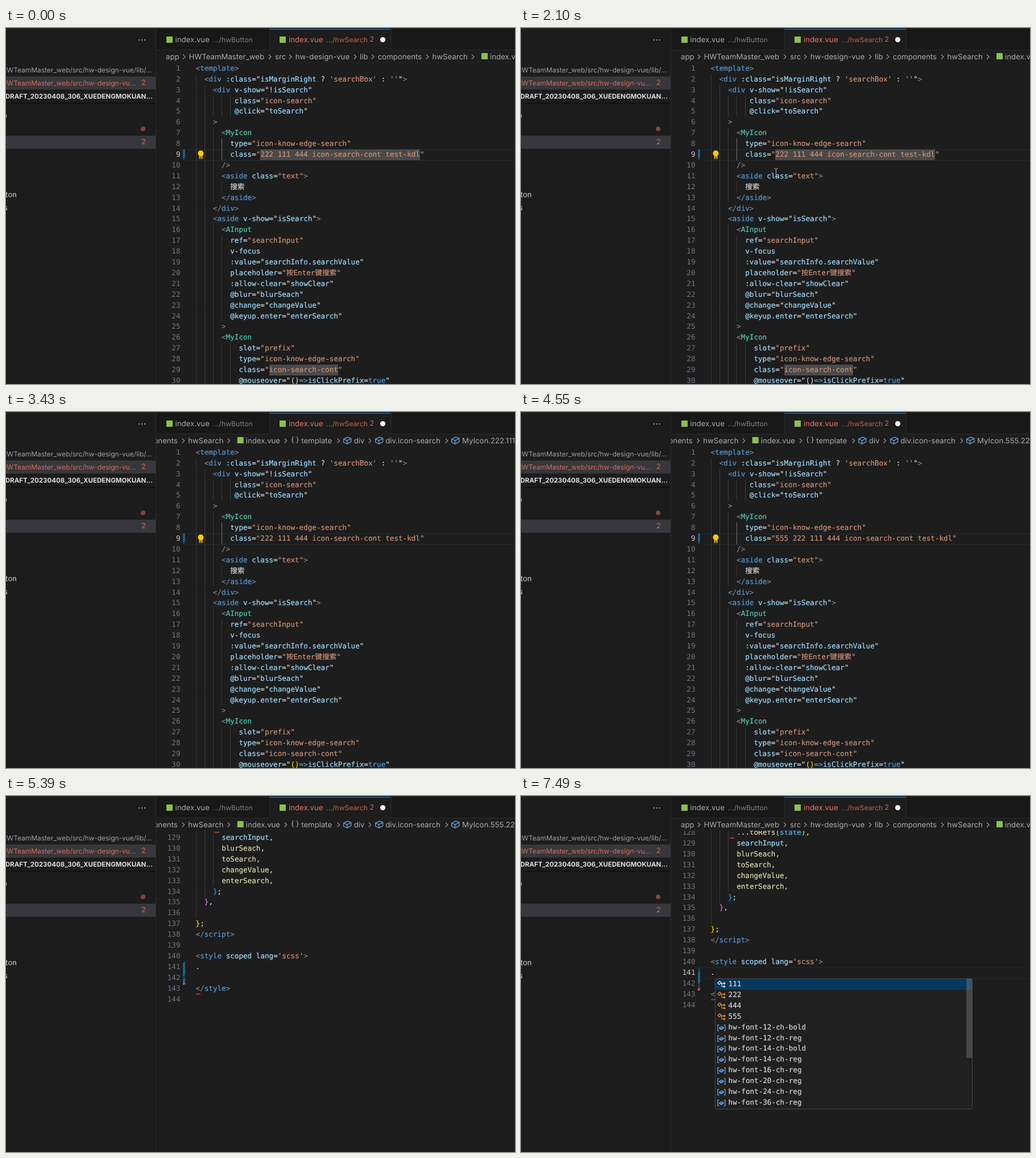
These frames come from a looping animation (895 px wide and 625 px high, 8 s). An HTML page:

```html
<!DOCTYPE html>
<html lang="en">
<head>
<meta charset="utf-8">
<title>Editor</title>
<style>
html, body { margin: 0; width: 100%; height: 100%; overflow: hidden; background: #1d1d1d; }
body { position: relative; text-rendering: geometricPrecision; -webkit-font-smoothing: antialiased; }
div, svg { position: absolute; }
.ui { font: 13.2px/20px Inter, "Noto Sans", sans-serif; white-space: pre; color: #ababab; }
.code { font: 12.6px/18.9px "DejaVu Sans Mono", "Noto Sans CJK SC", "Noto Sans CJK", monospace; white-space: pre; color: #d4d4d4; -webkit-text-stroke: .2px; }
#crumbs, #editor { inset: 0; overflow: hidden; }
#crumbs { clip-path: inset(40px 0 0 264px); }
#editor { clip-path: inset(61px 0 0 264px); --paren: #d4d4d4; }
.num { left: 256px; width: 50.5px; text-align: right; color: #6e7681; -webkit-text-stroke: 0; }
.hatch { left: 311px; width: 4px; background: repeating-linear-gradient(-45deg, #1f80bb 0 1.3px, #1d1d1d 1.3px 2.2px); }
.panel { box-sizing: border-box; background: #202020; border: 1px solid #454545; border-radius: 3px; overflow: hidden; }
</style>
</head>
<body>
<script>
const LOOP = 8000, STEP = 70;
const X0 = 333.6, CW = 7.586, TOP = 61.8, LH = 18.9;
const C = { grey: '#808080', tag: '#569cd6', comp: '#4ec9b0', attr: '#9cdcfe', str: '#ce9178',
  text: '#d4d4d4', fn: '#dcdcaa', red: '#ee7562', dim: '#d36c58', link: '#4daafc' };
const BRACKETS = ['#ffd700', '#da70d6', '#179fff'];

function add(parent, css, html = '', cls = '') {
  const d = document.createElement('div');
  d.style.cssText = css;
  d.className = cls;
  d.innerHTML = html;
  parent.append(d);
  return d;
}
const box = (p, x, y, w, h, bg, extra = '') =>
  add(p, `left:${x}px;top:${y}px;width:${w}px;height:${h}px;background:${bg};${extra}`);
const label = (p, x, mid, text, color = '', extra = '') =>
  add(p, `left:${x}px;top:${mid - 10}px;${color && `color:${color};`}${extra}`, text, 'ui');
const mono = (p, x, mid, html) => add(p, `left:${x}px;top:${mid - LH / 2}px`, html, 'code');
const icon = (p, x, y, w, h, shape) => add(p, `left:${x}px;top:${y}px;width:${w}px;height:${h}px`,
  `<svg width="${w}" height="${h}" viewBox="0 0 ${w} ${h}" style="left:0;top:0;overflow:visible">${shape}</svg>`);
const show = (e, on) => { e.style.display = on ? '' : 'none'; };
const esc = s => s.replace(/&/g, '&amp;').replace(/</g, '&lt;').replace(/>/g, '&gt;');
const ink = (color, s) => `<span style="color:${color}">${esc(s)}</span>`;
const lineTop = n => TOP + (n - 1) * LH;
const colX = c => X0 + c * CW;

// Code text
const head = `<template>
  <div :class="isMarginRight ? 'searchBox' : ''">
    <div v-show="!isSearch"
         class="icon-search"
         @click="toSearch"
    >
      <MyIcon
        type="icon-know-edge-search"
        class="222 111 444 icon-search-cont test-kdl"
      />
      <aside class="text">
        搜索
      </aside>
    </div>
    <aside v-show="isSearch">
      <AInput
        ref="searchInput"
        v-focus
        :value="searchInfo.searchValue"
        placeholder="按Enter键搜索"
        :allow-clear="showClear"
        @blur="blurSeach"
        @change="changeValue"
        @keyup.enter="enterSearch"
      >
      <MyIcon
          slot="prefix"
          type="icon-know-edge-search"
          class="icon-search-cont"
          @mouseover="()=>isClickPrefix=true"`.split('\n');
const middle = ['    const changeValue = () => {', '      state.showClear = true;', '      toSearch(state);',
  '    };', '', '    const blurSeach = () => {', '      state.isSearch = false;', '    };', ''];
const tail = `      ...toRefs(state),
      searchInput,
      blurSeach,
      toSearch,
      changeValue,
      enterSearch,
    };
  },
  
};
<\/script>

<style scoped lang='scss'>
.

</style>
`.split('\n');
const lines = [...head];
while (lines.length < 127) lines.push(middle[lines.length % middle.length]);
lines.push(...tail);

function paintExpr(s) {
  return s.replace(/('[^']*')|(=>|\btrue\b)|([\w$]+)|([()])|([^\w'])/g, (m, str, key, id, par) =>
    ink(str ? C.str : key ? C.tag : id ? C.attr : par ? 'var(--paren)' : C.text, m));
}
function paintMarkup(s) {
  return s.replace(/(<\/?)(\w+)|([:@]?[\w.-]+)(?:(=)("[^"]*"|'[^']*'))?|(\/?>)|([\s\S])/g,
    (m, open, tag, name, eq, val, close) => {
      if (open) return ink(C.grey, open) + ink(/[A-Z]/.test(tag) ? C.comp : C.tag, tag);
      if (close) return ink(C.grey, close);
      if (!name) return m;
      const left = ink(C.attr, name) + (eq || '');
      if (!val) return left;
      return left + (/^([:@]|v-)/.test(name) ? `"${paintExpr(val.slice(1, -1))}"` : ink(C.str, val));
    });
}
function paintScript(s) {
  const color = BRACKETS[s.search(/\S|$/) / 2 % 3];
  return s.replace(/\b(const|true|false)\b|\b(blurSeach|toSearch|changeValue|enterSearch|toRefs)\b|\b(state)\b|(\w+)|([{}()])|(.)/g,
    (m, key, fn, state, id, br) =>
      ink(key ? C.tag : fn ? C.fn : state ? '#4fc1ff' : id ? C.attr : br ? color : C.text, m));
}
const paint = (s, n) => n <= 30 || (n >= 138 && n !== 141) ? paintMarkup(s) : paintScript(s);

// Side bar
const side = box(document.body, 0, 0, 263, 625, '#1c1c1c', 'overflow:hidden;border-right:1px solid #2b2b2b');
const small = 'font-size:11.95px';
box(side, 0, 85, 263, 23, '#37373d');
box(side, 0, 189, 263, 23, '#37373d');
box(side, 0, 131, 263, 3, 'linear-gradient(#0e0e0e, #1c1c1c)');
label(side, -7.5, 73.5, 'HWTeamMaster_web/src/hw-design-vue/lib/...', '#a0a0a0', small);
label(side, -7.5, 97, 'HWTeamMaster_web/src/hw-design-vu...', C.dim, small);
label(side, 238, 97, '2', C.dim, 'font-size:12.6px');
add(side, 'right:5px;top:109.5px;color:#dedede;font-size:11.55px;font-weight:700', 'DRAFT_20230408_306_XUEDENGMOKUAN...', 'ui');
label(side, -6, 154, 'o', '#cccccc');
box(side, 237, 173, 8, 8, '#84493e', 'border-radius:50%');
label(side, 238, 200.5, '2', C.dim, 'font-size:12.6px');
label(side, -1, 293, 'ton', '#cccccc');
label(side, -4, 315.5, 's', '#cccccc');
for (const x of [232.5, 237.7, 242.9]) box(side, x, 19.5, 2, 2, '#c8c8c8', 'border-radius:50%');

// Tabs
box(document.body, 264, 0, 631, 38, '#181818', 'border-bottom:1px solid #2b2b2b');
box(document.body, 463, 1, 213, 38, '#1d1d1d', 'border:solid #2b2b2b;border-width:0 1px');
box(document.body, 0, 1, 895, 1, '#2b2b2b');
box(document.body, 463, 1, 214, 2, '#105a90');
const GREEN = '#8dc149';
const tabPath = 'font-size:12.2px';
box(document.body, 281.5, 14.5, 11, 11, GREEN);
label(document.body, 297.5, 20.5, 'index.vue', '#a9a9a9');
label(document.body, 364, 20.5, '.../hwButton', '#808080', tabPath);
box(document.body, 480.5, 14.5, 11, 11, GREEN);
label(document.body, 497, 20.5, 'index.vue', C.red);
label(document.body, 563.5, 20.5, '.../hwSearch', '#c2624f', tabPath);
label(document.body, 639.5, 20.5, '2', C.dim, 'font-size:12.6px');
box(document.body, 657.5, 15.5, 9, 9, '#fff', 'border-radius:50%');

// Breadcrumbs
const crumbs = add(document.body, '');
crumbs.id = 'crumbs';
const trail = add(crumbs, 'left:0;top:0');
const crumbNames = [[281, 'app'], [321.5, 'HWTeamMaster_web'], [473, 'src'], [508.7, 'hw-design-vue'], [622, 'lib'],
  [653.7, 'components'], [749.5, 'hwSearch'], [851, 'index.vue'], [948.5, 'template'], [1041, 'div'], [1096.5, 'div.icon-search']];
crumbNames.forEach(([x, s]) => label(trail, x, 50.5, s));
const lastCrumb = label(trail, 1231.3, 50.5, '');
for (const x of [313, 464, 500, 614, 645, 741, 821, 921, 1013.5, 1068.5, 1203.5])
  icon(trail, x - 3, 45.5, 6, 9, '<path d="M1 .5 5 4.5 1 8.5" fill="none" stroke="#9a9a9a" stroke-width="1.1"/>');
box(trail, 835.5, 44, 11, 11, GREEN);
label(trail, 930.5, 50, '{ }', '#b8b8b8', 'font-size:12.5px');
for (const x of [1029.5, 1085, 1219.5])
  icon(trail, x - 7.5, 43, 15, 14, '<path d="M1 4.5 8 1 14 3.6V9.5L7 13 1 10.2ZM1 4.5 7 7.2 14 3.6M7 7.2V13" fill="none" stroke="#75beff" stroke-width="1.1" stroke-linejoin="round"/>');

// Editor
const editor = add(document.body, '');
editor.id = 'editor';
const page = add(editor, 'left:0;top:0');
const current = box(page, 320, 0, 575, LH - 1, 'none', 'border:solid #2a2a2a;border-width:1px 0');
const mark = (n, c, len, bg) => box(page, colX(c), lineTop(n), len * CW, LH, bg);
const words = [mark(9, 15, 37, '#4a4a4a'), mark(29, 17, 16, '#4a4a4a')];
const hovered = mark(11, 13, 5, '#222d37');
const dotMark = mark(141, 0, 1, '#25506f');
const nums = [], rows = [];
lines.forEach((s, i) => {
  const n = i + 1, y = lineTop(n), indent = s.search(/\S|$/);
  for (let g = 0; g < indent; g += 2)
    box(page, Math.round(colX(g)), y, 1, LH, g === 6 && (n === 8 || n === 9) ? '#707070' : '#3b3b3b');
  nums[n] = add(page, `top:${y}px`, n, 'code num');
  rows[n] = add(page, `left:${X0}px;top:${y}px`, paint(s, n), 'code');
});
add(page, `top:${lineTop(9)}px;height:${LH}px`, '', 'hatch');
add(page, `top:${lineTop(141)}px;height:${2 * LH}px`, '', 'hatch');
icon(page, 311, lineTop(143) - 2, 5, 5, '<path d="M0 0 5 2.5 0 5Z" fill="#f14c4c"/>');
const wave = (x, y) => icon(page, x, y, 8, 3, '<path d="M0 2.5 2 .7 4 2.3 6 .7 8 2.3" fill="none" stroke="#e0483e" stroke-width="1.1"/>');
wave(367, lineTop(128) + 16.5);
wave(X0, lineTop(143) + 17);
icon(page, 337, lineTop(9) + 1.5, 11, 15,
  '<path d="M5.5 0a5 5 0 0 1 3 9V10.5h-6V9a5 5 0 0 1 3-9Z" fill="#ffcc00"/><path d="M3 11.5h5V14H3Z" fill="none" stroke="#ffcc00" stroke-width="1.2"/>');
const caret = box(page, 0, 0, 2, LH, '#c8c8c8');

// Hover card
const card = add(document.body, 'left:432px;top:128px;width:480px;height:123px', '', 'panel');
const hoverY = y => y - 129;
mono(card, 9, hoverY(142.5), '(' + ink(C.attr, 'property') + ') class: ' + ink(C.attr, 'string'));
box(card, 0, hoverY(156), 480, 1, '#3a3a3a');
const cardText = (x, y, s, c = '#d0d0d0') => label(card, x - 433, hoverY(y), s, c, 'font-size:12.55px');
cardText(442, 171, 'A space-separated list of the classes of the element. Classes allows CSS and');
cardText(442, 190.5, 'select and access specific elements via the');
cardText(702.5, 190.5, 'class selectors', C.link);
cardText(794.5, 190.5, 'or functions like the');
box(card, 10, hoverY(200.5), 257, 17, '#2b2b2b', 'border-radius:3px');
mono(card, 13.6, hoverY(209.5), ink(C.link, 'Document.getElementsByClassName()'));
cardText(701.5, 209.5, '.');
cardText(442, 236.5, 'MDN Reference', C.link);

// Completion list
const list = add(document.body, 'left:341px;top:320px;width:453px;height:230px', '', 'panel');
box(list, 0, 0, 451, LH, '#04395e');
const fonts = ['12-ch-bold', '12-ch-reg', '14-ch-bold', '14-ch-reg', '16-ch-reg', '20-ch-reg', '24-ch-reg', '36-ch-reg'];
['111', '222', '444', '555', ...fonts.map(f => 'hw-font-' + f)].forEach((s, i) => {
  const y = i * LH, tint = i ? '#ee9d28' : '#ffffff';
  mono(list, 22.6, y + LH / 2, s);
  icon(list, 2.5, y + 3, 15, 14, i < 4
    ? `<path d="M1 4.5 4.5 1 7 3.5 3.5 7ZM6 5h5M8 5V10.5H11M11 5 12.5 3.5 14 5 12.5 6.5ZM11 10.5 12.5 9 14 10.5 12.5 12Z" fill="none" stroke="${tint}" stroke-width="1.1"/>`
    : '<path d="M3.5 2H1V12H3.5M11.5 2H14V12H11.5M4 6.5 8 4.5 11 6V8L7 10 4 8.5ZM4 6.5 7 8 11 6M7 8V10" fill="none" stroke="#75beff" stroke-width="1.1"/>');
});
box(list, 441, 0, 10, 139, 'rgba(121,121,121,.45)');

// Pointers
const arrow = icon(document.body, 0, 0, 11, 17,
  '<path d="M.7 .8V13.2L3.6 10.5 5.6 15.2 8 14.2 6 9.6H10Z" fill="#000" stroke="#fff" stroke-width="1.1"/>');
const beam = icon(document.body, 0, 0, 7, 16,
  '<path d="M.5 .5Q3.5 .5 3.5 3V13Q3.5 15.5 .5 15.5M6.5 .5Q3.5 .5 3.5 3V13Q3.5 15.5 6.5 15.5" fill="none" stroke="#bbb"/>');

const clamp = v => Math.min(1, Math.max(0, v));
const span = (t, a, b) => clamp((t - a) / (b - a));
const smooth = p => p * p * (3 - 2 * p);
const mix = (a, b, p) => a + (b - a) * p;
const within = (t, a, b) => t >= a && t < b;
const moveTo = (e, x, y) => { e.style.transform = `translate(${x}px,${y}px)`; };

const END = 2702.7, REST = 2406.8;
function scrollAt(t) {
  if (t < 5040) return END * smooth(span(t, 4620, 4830));
  return REST + (END - REST) * Math.pow(1 - span(t, 5040, 5460), 1.9);
}
// [time, text put before the class names, caret column]
const typing = [[0, '', 15], [3780, ' ', 15], [3850, '5 ', 16], [3920, '55 ', 17], [4060, '555 ', 18]];
let typed = '';

function render(t) {
  const low = t >= 6440, active = low ? 141 : 9;
  moveTo(page, 0, -scrollAt(t));

  const [, prefix, col] = typing.filter(k => t >= k[0]).pop();
  if (prefix !== typed) {
    typed = prefix;
    rows[9].innerHTML = paint(lines[8].replace('"', '"' + prefix), 9);
  }
  const erased = within(t, 6720, 6930);
  show(rows[141], !erased);
  show(dotMark, within(t, 6650, 6720));
  words.forEach(w => show(w, t < 2870));
  editor.style.setProperty('--paren', t < 2520 ? C.text : BRACKETS[0]);

  current.style.top = lineTop(active) + 'px';
  nums[9].style.color = low ? '' : '#cccccc';
  nums[141].style.color = low ? '#cccccc' : '';
  show(caret, within(t, 2870, 3430) || within(t, 3780, 4550) || within(t, 6440, 7490));
  caret.style.left = (low ? colX(erased ? 0 : 1) : colX(col)) + 'px';
  caret.style.top = lineTop(active) + 'px';

  moveTo(trail, within(t, 3080, 6510) ? -429.3 : 0, 0);
  lastCrumb.textContent = t < 4410 ? 'MyIcon.222.111.444' : 'MyIcon.555.222.111';

  const hover = within(t, 2520, 2870);
  show(card, hover);
  show(hovered, hover);
  card.style.opacity = mix(.5, 1, span(t, 2520, 2660));
  show(list, t >= 7000);

  show(arrow, within(t, 70, 1610));
  const near = smooth(span(t, 0, 840)), settle = smooth(span(t, 840, 1120));
  moveTo(arrow, mix(mix(560, 456, near), 447.5, settle), mix(mix(300, 228, near), 225.5, settle));

  const down = smooth(span(t, 1680, 2100)), across = smooth(span(t, 5530, 6370));
  show(beam, within(t, 1610, 2520) || within(t, 5600, 6440));
  if (t < 4000) moveTo(beam, 445, mix(214, 246, down));
  else moveTo(beam, mix(535, 343, across), mix(250, 303, across));
}

const start = performance.now();
function tick() {
  const t = (performance.now() - start) % LOOP;
  render(Math.floor(t / STEP + 1e-6) * STEP);
  requestAnimationFrame(tick);
}
render(0);
requestAnimationFrame(tick);
</script>
</body>
</html>
```
